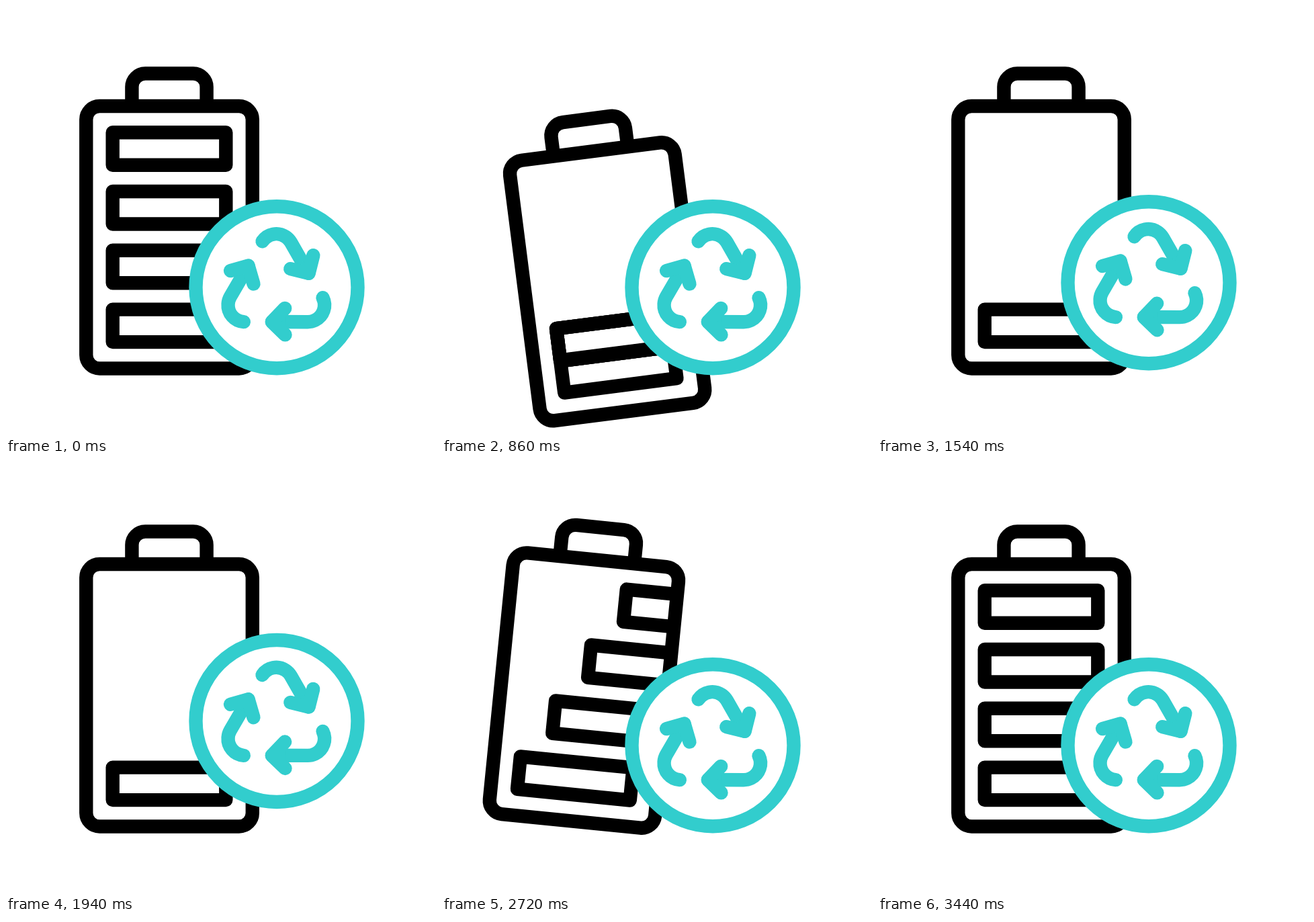
Write an HTML page with a canvas that moves like this. It is 640x640 px and loops after 3.6 s.

```html
<!DOCTYPE html>
<html lang="en">
<head>
<meta charset="utf-8">
<title>Battery recycling</title>
<style>
html, body { margin: 0; width: 100%; height: 100%; overflow: hidden; background: #fff; }
canvas { display: block; width: 640px; height: 640px; }
</style>
</head>
<body>
<canvas id="stage" width="640" height="640"></canvas>
<script>
const ctx = document.getElementById('stage').getContext('2d');
const LOOP = 3600, STEP = 20;
const TEAL = '#32cdcd';
const BAR_TOP = 188.2, BAR_PITCH = 87.8;

const smooth = u => u * u * (3 - 2 * u);
const steep = u => u ** 2.2 / (u ** 2.2 + (1 - u) ** 2.2);
const clamp = u => Math.min(1, Math.max(0, u));

// Interpolates through [time, value] keys.
function track(t, keys, ease = smooth) {
  if (t <= keys[0][0]) return keys[0][1];
  for (let i = 1; i < keys.length; i++) {
    const [t0, v0] = keys[i - 1], [t1, v1] = keys[i];
    if (t <= t1) return v0 + (v1 - v0) * ease((t - t0) / (t1 - t0));
  }
  return keys[keys.length - 1][1];
}

function batteryPose(t) {
  if (t < 2430) {
    const tilt = t < 800
      ? track(t, [[0, 0], [270, 3.3], [800, -7.5]], steep)
      : track(t, [[800, -7.5], [1390, 0]]);
    return { x: 0, y: track(t, [[0, 0], [270, -26], [780, 68], [1275, 0]], steep), tilt };
  }
  return {
    x: track(t, [[2430, 0], [2870, -40], [3030, -3], [3440, 0]]),
    y: track(t, [[2430, 0], [2870, -9.7], [3030, 18.2], [3440, 0]]),
    tilt: track(t, [[2430, 0], [2870, 7.8], [3030, -13.2], [3440, 0]])
  };
}

// Bars stack downwards one slot at a time, then slide back in from the right.
function barOffset(i, t) {
  if (t < 1500) {
    const slot = track(t, [[0, 0], [348, 1], [696, 2], [1044, 3]]);
    return { x: 0, y: Math.max(0, slot - i) * BAR_PITCH };
  }
  if (i === 3) return { x: 0, y: 0 };
  const start = 2430 + (2 - i) * 73;
  return { x: 220 * (1 - clamp((t - start) / 362)), y: 0 };
}

function drawBattery(t) {
  const pose = batteryPose(t);
  ctx.save();
  ctx.translate(243 + pose.x, 320 + pose.y);
  ctx.rotate(pose.tilt * Math.PI / 180);
  ctx.translate(-243, -320);
  ctx.strokeStyle = '#000';
  ctx.lineWidth = 20.4;

  ctx.save();
  ctx.beginPath();
  ctx.roundRect(119.3, 149, 247.5, 390.5, 20);
  ctx.clip();
  for (let i = 0; i < 4; i++) {
    const off = barOffset(i, t);
    ctx.strokeRect(158.7 + off.x, BAR_TOP + i * BAR_PITCH + off.y, 168.6, 48.5);
  }
  ctx.restore();

  ctx.beginPath();
  ctx.roundRect(119.3, 149, 247.5, 390.5, 20);
  ctx.stroke();
  ctx.beginPath();
  ctx.moveTo(187.4, 149);
  ctx.arcTo(187.4, 100.5, 243, 100.5, 20);
  ctx.arcTo(298.6, 100.5, 298.6, 149, 20);
  ctx.lineTo(298.6, 149);
  ctx.stroke();
  ctx.restore();
}

function drawArrow() {
  ctx.beginPath();
  ctx.arc(0, -54, 25, -2.55, -Math.PI / 6);
  ctx.lineTo(48, -20.5);
  ctx.stroke();
  ctx.beginPath();
  ctx.moveTo(21, -27);
  ctx.lineTo(48.3, -20.3);
  ctx.lineTo(55, -47);
  ctx.fill();
  ctx.stroke();
}

function drawBadge(t) {
  ctx.save();
  ctx.translate(403, 418.8 + track(t, [[1400, 0], [1900, -37], [2400, 0]]));
  ctx.lineWidth = 20.4;
  ctx.strokeStyle = TEAL;
  ctx.fillStyle = '#fff';
  ctx.beginPath();
  ctx.arc(0, 0, 120.5, 0, 2 * Math.PI);
  ctx.fill();
  ctx.stroke();

  ctx.translate(-0.7, -0.6);
  ctx.fillStyle = TEAL;
  ctx.lineCap = 'round';
  for (let i = 0; i < 3; i++) {
    drawArrow();
    ctx.rotate(2 * Math.PI / 3);
  }
  ctx.restore();
}

function draw(now) {
  const t = Math.floor((now % LOOP) / STEP) * STEP;
  ctx.fillStyle = '#fff';
  ctx.fillRect(0, 0, 640, 640);
  ctx.lineJoin = 'round';
  drawBattery(t);
  drawBadge(t);
}

let begin;
function tick(now) {
  if (begin === undefined) begin = now;
  draw(Math.max(0, now - begin));
  requestAnimationFrame(tick);
}
draw(0);
requestAnimationFrame(tick);
</script>
</body>
</html>
```
